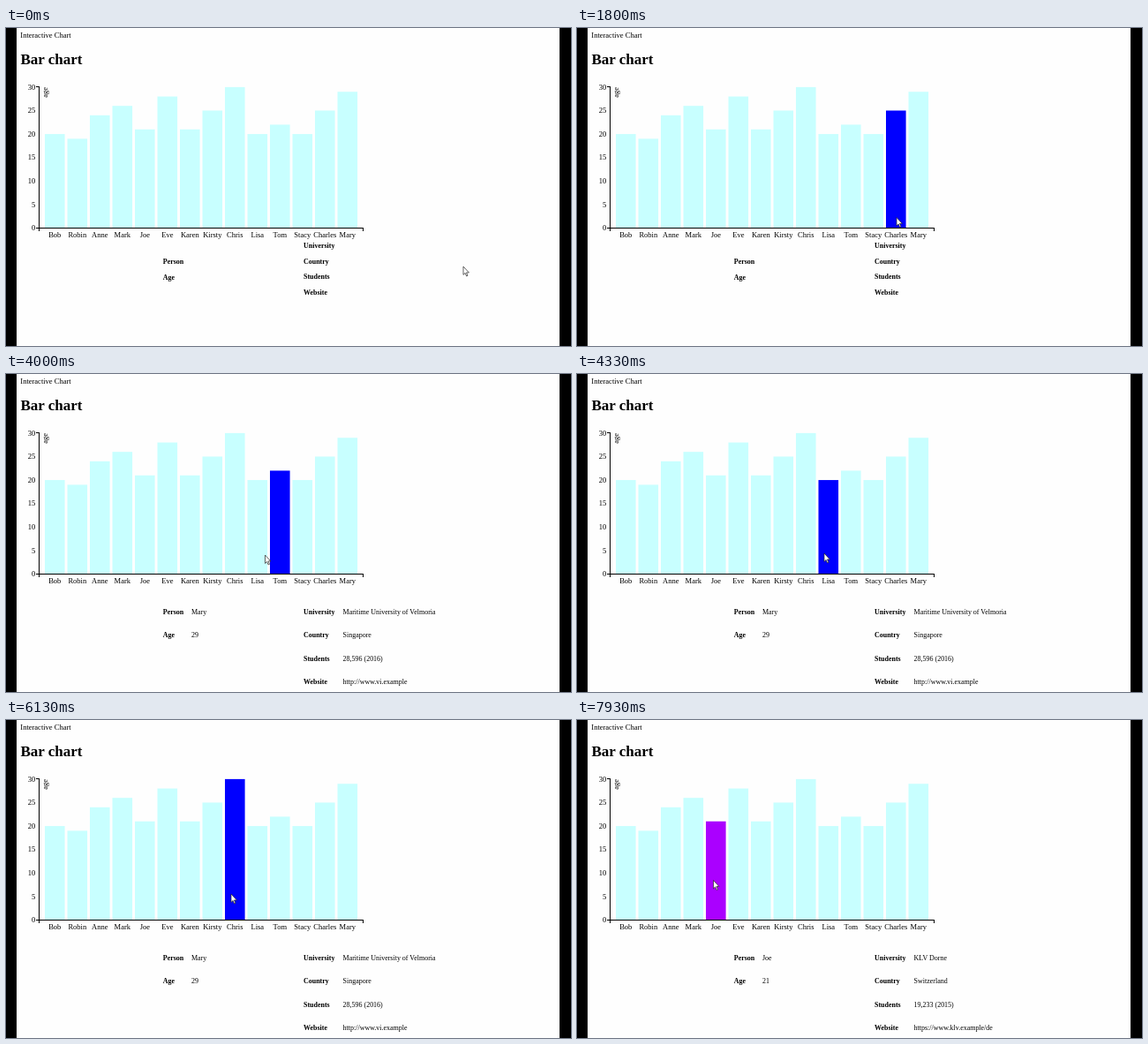
An HTML page for the animation above (8000 ms loop, 640 px wide and 360 px high).

```html
<!DOCTYPE html>
<html lang="en">
<head>
<meta charset="utf-8">
<title>Bar chart</title>
<style>
  html, body { margin: 0; width: 100%; height: 100%; overflow: hidden; background: #fefefe; }
  svg { display: block; width: 100vw; height: 100vh; }
  text { font: 8.5px "Liberation Serif", "Times New Roman", serif; fill: #000; }
  .title { font-size: 17px; font-weight: bold; }
  .cell { font-size: 7.97px; }
  .head { font-weight: bold; }
  .axis { fill: none; stroke: #000; shape-rendering: crispEdges; }
</style>
</head>
<body>
<svg id="stage" viewBox="0 0 640 360"></svg>
<script>
const NS = 'http://www.w3.org/2000/svg';
const stage = document.getElementById('stage');
const LOOP = 8000, FPS = 15;
const BASE = 226.4, UNIT = 5.317, LEFT = 44, STEP = 25.5, BAR = 22.6;
const PALE = '#c8ffff', HOVER = '#0000ff', PICKED = '#aa00ff';

const people = [
  ['Bob', 20], ['Robin', 19], ['Anne', 24], ['Mark', 26], ['Joe', 21], ['Eve', 28], ['Karen', 21],
  ['Kirsty', 25], ['Chris', 30], ['Lisa', 20], ['Tom', 22], ['Stacy', 20], ['Charles', 25], ['Mary', 29]
];

// tick: bar clicked, then university, country, students, website
const clicks = [
  { tick: 43, bar: 13, info: ['Maritime University of Velmoria', 'Singapore', '28,596 (2016)', 'http://www.vi.example'] },
  { tick: 101, bar: 8, info: ['University of Ostermond', 'United Kingdom', '21,656 (2016)', 'https://www.ot.example'] },
  { tick: 117, bar: 4, info: ['KLV Dorne', 'Switzerland', '19,233 (2015)', 'https://www.klv.example/de'] }
];

// pointer path: tick, x, y
const path = [
  [0, 518, 270], [22, 518, 270], [26, 366, 216], [27, 362, 214.5], [29, 366, 213], [34, 387, 210],
  [55, 387, 210], [60, 293.5, 205], [64, 280, 203], [76, 280, 203], [78, 247.3, 200], [79, 243.5, 199],
  [83, 255, 197], [105, 255, 197], [106, 229, 193], [109, 163, 183], [115, 163, 183], [117, 154.5, 181.5]
];

function add(tag, attrs, content = '') {
  const node = document.createElementNS(NS, tag);
  for (const key in attrs) node.setAttribute(key, attrs[key]);
  node.textContent = content;
  return stage.appendChild(node);
}

function label(content, x, y, cls = '', anchor = 'start') {
  return add('text', { x, y, class: cls, 'text-anchor': anchor }, content);
}

add('rect', { width: 640, height: 360, fill: '#fefefe' });
add('rect', { width: 12, height: 360 });
add('rect', { x: 627, width: 13, height: 360 });
label('Interactive Chart', 16.3, 11.2);
label('Bar chart', 16.5, 41, 'title');

const bars = people.map(([name, age], i) => {
  const x = LEFT + i * STEP, height = age * UNIT;
  label(name, x + BAR / 2, 237.2, '', 'middle');
  return add('rect', { x, y: BASE - height, width: BAR, height, fill: PALE });
});

add('path', { class: 'axis', d: 'M34 66.5H37.5V226.5H34M37.5 230V226.5H404.5V230' });
for (let v = 0; v <= 30; v += 5) label(v, 33.2, BASE - v * UNIT + 2.8, '', 'end');
add('text', { transform: 'translate(46.5 67) rotate(-90)', 'text-anchor': 'end' }, 'age');

function row(name, x, valueX, emptyY, fullY) {
  const head = label(name, x, 0, 'cell head');
  const value = label('', valueX, fullY, 'cell');
  return content => {
    head.setAttribute('y', content ? fullY : emptyY);
    value.textContent = content;
  };
}

const personRows = ['Person', 'Age'].map((name, i) =>
  row(name, 177.8, 210, 267.3 + 17.5 * i, 271.8 + 26.5 * i));
const infoRows = ['University', 'Country', 'Students', 'Website'].map((name, i) =>
  row(name, 337, 381.6, 249.2 + 17.5 * i, 271.8 + 26.5 * i));

const pointer = add('path', {
  d: 'M0 0V9.4L2.1 7.4 3.6 10.9 5 10.3 3.5 6.9H6.4Z',
  fill: '#fff', stroke: '#222', 'stroke-width': 0.7
});

function pointerAt(tick) {
  let i = 0;
  while (i < path.length - 1 && path[i + 1][0] <= tick) i++;
  const a = path[i], b = path[i + 1] || a;
  const p = b === a ? 0 : (tick - a[0]) / (b[0] - a[0]);
  return [a[1] + (b[1] - a[1]) * p, a[2] + (b[2] - a[2]) * p];
}

function barAt([x, y]) {
  const i = Math.floor((x - LEFT) / STEP);
  const inside = people[i] && x - LEFT - i * STEP < BAR && y < BASE && y > BASE - people[i][1] * UNIT;
  return inside ? i : -1;
}

function render(ms) {
  const tick = Math.floor((ms % LOOP + 7) * FPS / 1000) % (LOOP * FPS / 1000);
  const picked = clicks.filter(c => c.tick <= tick).pop();

  // the page reacts one tick after the pointer
  const over = barAt(pointerAt(Math.max(0, tick - 1)));
  bars.forEach((bar, i) => {
    const lit = picked && picked.bar === i ? PICKED : HOVER;
    bar.setAttribute('fill', i === over ? lit : PALE);
  });

  personRows.forEach((set, i) => set(picked ? people[picked.bar][i] : ''));
  infoRows.forEach((set, i) => set(picked ? picked.info[i] : ''));
  pointer.setAttribute('transform', `translate(${pointerAt(tick)})`);
}

const start = performance.now();
function loop() {
  render(performance.now() - start);
  requestAnimationFrame(loop);
}
loop();
</script>
</body>
</html>
```
